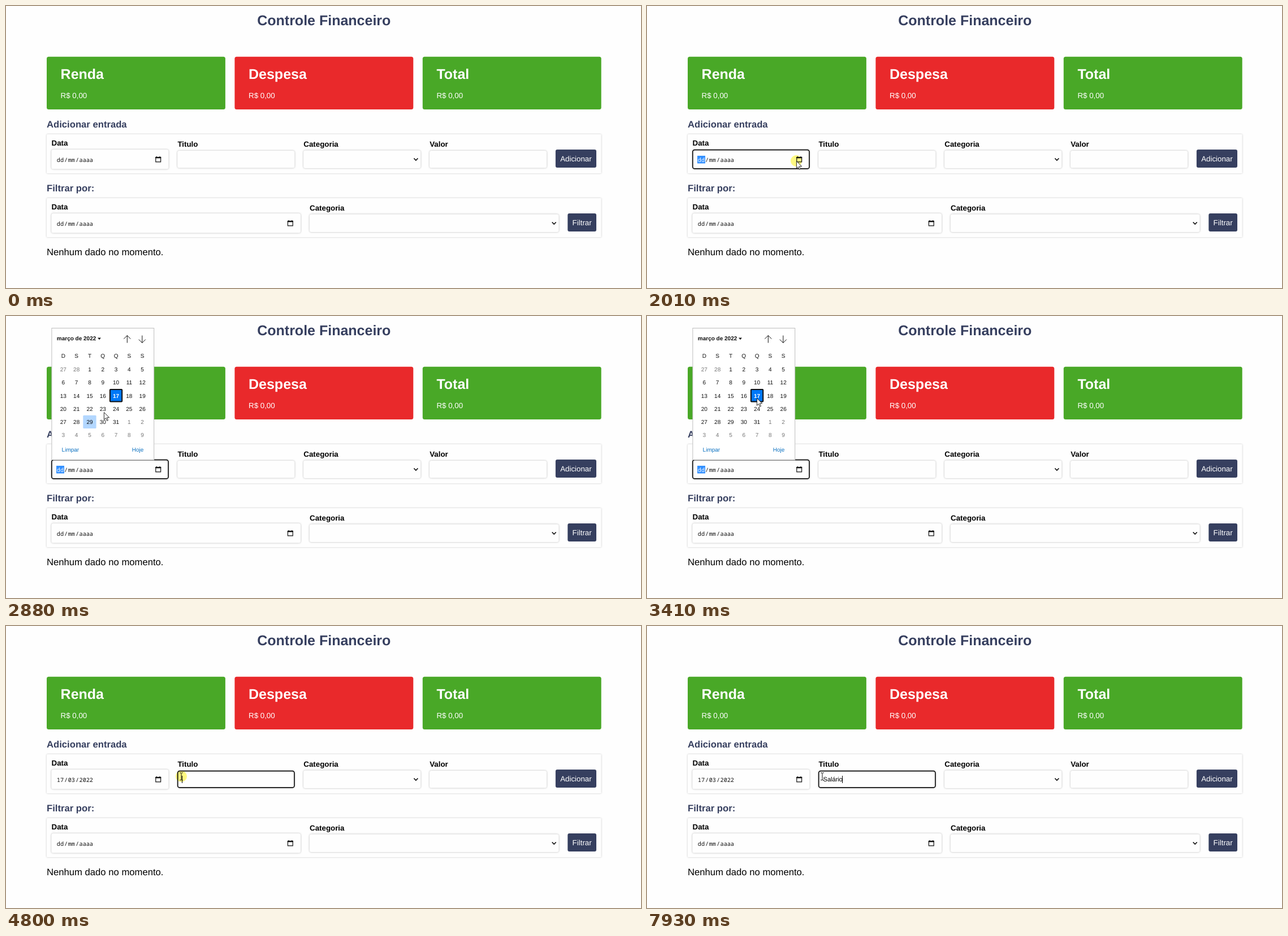
These frames come from a looping animation (1123x499 px, 8 s). An HTML page:

```html
<!DOCTYPE html>
<html lang="pt-BR">
<head>
<meta charset="utf-8">
<title>Controle Financeiro</title>
<style>
  html, body { margin: 0; width: 100%; height: 100%; overflow: hidden; background: #fefefe; }
  svg { display: block; width: 100%; height: 100%; }
  text { font-family: "Liberation Sans", Arial, sans-serif; text-rendering: geometricPrecision; white-space: pre; }
  .mono { font-family: "Noto Sans Mono", monospace; }
  .b { font-weight: bold; }
  .mid { text-anchor: middle; }
  .panel { filter: drop-shadow(0 0 1.6px rgba(0, 0, 0, .24)); }
  .field { filter: drop-shadow(0 0 1.4px rgba(0, 0, 0, .3)); }
</style>
</head>
<body>
<svg id="stage" viewBox="0 0 1123 499" xmlns="http://www.w3.org/2000/svg"></svg>
<script>
const LOOP = 8000;
const NAVY = '#363f5f', GREEN = '#49a827', RED = '#e9292b', PAPER = '#fefefe', INK = '#101010';
const LEFT = 72, GAP = 15.7;

const rect = (x, y, w, h, fill, r = 0, more = '') =>
  `<rect x="${x}" y="${y}" width="${w}" height="${h}" rx="${r}" fill="${fill}" ${more}/>`;
const text = (x, y, size, str, fill = '#000', cls = '', more = '') =>
  `<text x="${x}" y="${y}" font-size="${size}" fill="${fill}" class="${cls}" ${more}>${str}</text>`;
const line = (d, width = 1, more = '') =>
  `<path d="${d}" fill="none" stroke="${INK}" stroke-width="${width}" ${more}/>`;
const group = (id, body) => `<g id="${id}">${body}</g>`;

const card = ([name, color], i) => {
  const x = LEFT + 332.4 * i;
  return rect(x, 89.8, 315.9, 93.2, color, 3.5) +
    text(x + 24.6, 129, 25, name, '#fff', 'b') +
    text(x + 24.6, 163, 13.33, 'R$ 0,00', '#fff');
};

// A date in segments, so that its first one can be selected.
function dateText(id, x, y) {
  let count = 0, out = '';
  ['dd', '/', 'mm', '/', 'aaaa'].forEach((part, i) => {
    out += text(x + 9.5 + count * 6.62, y, 10.2, part, INK, 'mono', `id="${id}-${i}"`);
    count += part.length;
  });
  return out;
}

const dateIcon = (x, y) => line(`M${x + .6} ${y + 1.6}h8.8v8.3h-8.8z`, 1.2) +
  line(`M${x} ${y + 2.2}h10`, 2.4) + line(`M${x + 2.2} ${y}v2m5.6 0v-2`, 1.2);
const chevron = (x, y) => line(`M${x - 3.5} ${y - 1.8}l3.5 3.5 3.5-3.5`, 1.7);

const LIFT = { date: 0, select: 1.5, text: 2 };

function form(id, top, width, fields, action) {
  let x = 80.3;
  let out = rect(LEFT, top, 980.6, 69, PAPER, 1.5, 'class="panel"');
  for (const [name, kind] of fields) {
    const lift = LIFT[kind], y = top + 27 + lift, h = 34.5 - 2 * lift, key = `${id}-${name}`;
    out += text(x + .2, top + 20 + lift, 13.33, name, '#000', 'b') +
      rect(x, y, width, h, PAPER, 3.5, 'class="field"') +
      rect(x + .5, y + .6, width - 1, h - 1.2, 'none', 3.5, `id="${key}-focus" stroke="${INK}" stroke-width="1.7" display="none"`);
    if (kind === 'date') {
      out += rect(x + 8.7, top + 38, 14, 13.5, '#3390ff', 0, `id="${key}-selection" display="none"`) +
        dateText(key, x, top + 48.5) + dateIcon(x + width - 23.3, top + 39);
    }
    if (kind === 'select') out += chevron(x + width - 8.4, top + 44.3);
    x += width + GAP;
  }
  const w = 1044 - x;
  return out + rect(x, top + 27, w, 32, NAVY, 3) +
    text(x + w / 2, top + 47.6, 13.33, action, '#fff', 'mid');
}

// Calendar grid
const CELL = 23.3, GRID_X = 89.7, GRID_Y = 82.5;
const cellX = i => GRID_X + (i % 7) * CELL;
const cellY = i => GRID_Y + Math.floor(i / 7) * CELL;
const cellMid = i => cellX(i) + CELL / 2;

function calendar() {
  let out = rect(80.9, 21.5, 180.8, 233, '#fff', 0, 'stroke="#bdbdbd"') +
    text(89.8, 43.4, 10, 'março de 2022', INK, 'b') +
    `<path d="M162 38.5h6l-3 3.4z" fill="${INK}"/>` +
    line('M214.3 47.5v-13m-6 6l6-6 6 6M240.8 34.5v13m-6-6l6 6 6-6') +
    rect(0, 0, CELL, CELL, '#b3d7ff', 1.5, 'id="hover"');
  [...'DSTQQSS'].forEach((d, i) => out += text(cellMid(i), 74, 10, d, INK, 'mid'));
  for (let i = 0; i < 42; i++) {
    const day = new Date(2022, 1, 27 + i), inMonth = day.getMonth() === 2;
    const today = inMonth && day.getDate() === 17;
    if (today) out += rect(cellX(i) + 1, cellY(i) + 1, CELL - 2, CELL - 2, '#0078f8', 1, `stroke="${INK}" stroke-width="2"`);
    out += text(cellMid(i), cellY(i) + 15.4, 10, day.getDate(),
      today ? '#fff' : inMonth ? INK : '#767676', today ? 'mid b' : 'mid');
  }
  return out + text(98.6, 240.4, 10, 'Limpar', '#0a70c0') + text(222.8, 240.4, 10, 'Hoje', '#0a70c0');
}

const $ = id => document.getElementById(id);

$('stage').innerHTML =
  rect(0, 0, 1123, 499, PAPER) +
  text(562.3, 34, 25, 'Controle Financeiro', NAVY, 'b mid') +
  [['Renda', GREEN], ['Despesa', RED], ['Total', GREEN]].map(card).join('') +
  text(LEFT, 214.5, 16.67, 'Adicionar entrada', NAVY, 'b') +
  form('add', 227, 207.2, [['Data', 'date'], ['Titulo', 'text'], ['Categoria', 'select'], ['Valor', 'text']], 'Adicionar') +
  text(LEFT, 328, 16.67, 'Filtrar por:', NAVY, 'b') +
  form('filter', 340, 440.8, [['Data', 'date'], ['Categoria', 'select']], 'Filtrar') +
  text(LEFT, 441, 16.67, 'Nenhum dado no momento.') +
  text(311.5, 275, 11.1, '', '#000', '', 'id="entry"') +
  rect(0, 265, 1, 13, '#000', 0, 'id="caret"') +
  group('calendar', calendar()) +
  '<circle id="click" r="10" fill="#fffa82" style="mix-blend-mode:multiply"/>' +
  group('arrow', `<path d="M.4 .5v12.9l3-2.8 2.1 4.8 2-.9-2.1-4.7h4.2z" fill="#fff" stroke="${INK}" stroke-width=".9"/>`) +
  group('beam', line('M-2.8-6.2h2l.8.8.8-.8h2M0-5.4V5.9M-2.8 6.7h2l.8-.8.8.8h2'));

const ENTRANCE = { x: 1250, y: 515 };
const moves = [
  { start: 530, end: 780, steps: 5, x: 535, y: 357 },
  { start: 920, end: 1060, steps: 3, x: 203, y: 286 },
  { start: 1380, end: 1680, steps: 5, x: 264, y: 274 },
  { start: 2410, end: 2600, steps: 4, x: 127, y: 185 },
  { start: 2810, end: 2880, steps: 2, x: 173, y: 170 },
  { start: 2945, end: 3410, steps: 8, x: 194, y: 145 },
  { start: 4350, end: 4470, steps: 3, x: 310, y: 266 }
];
const OPEN = 2190, PICKED = 4020, BEAM = 4470;
const [FOCUS_DATE, PICK, FOCUS_TITLE] = [2010, 3700, 4800];
const CLICK_TIME = 180, HOVER_LAG = 70, BLINK = 540;
const bursts = [
  { start: 5340, gap: 320, letters: 'Sa' },
  { start: 6470, gap: 250, letters: 'lá' },
  { start: 7710, gap: 75, letters: 'rio' }
];
const keys = bursts.flatMap(({ start, gap, letters }) =>
  [...letters].map((letter, i) => ({ letter, time: start + i * gap })));

const within = (t, from, to) => t >= from && t < to;
const show = (id, on) => $(id).setAttribute('display', on ? 'inline' : 'none');
const place = (id, { x, y }) => $(id).setAttribute('transform', `translate(${x} ${y})`);

// Each move runs from the last resting place in equal, discrete steps.
function pointerAt(t) {
  let pos = ENTRANCE;
  for (const { start, end, steps, x, y } of moves) {
    if (t < start) break;
    const done = Math.floor((t - start) / (end - start) * (steps - 1) + 1e-6) + 1;
    const p = Math.min(1, done / steps);
    pos = { x: pos.x + (x - pos.x) * p, y: pos.y + (y - pos.y) * p };
  }
  return pos;
}

function renderPointer(t) {
  const pos = pointerAt(t);
  for (const id of ['arrow', 'beam', 'click']) place(id, pos);
  show('arrow', t < BEAM);
  show('beam', t >= BEAM);
  show('click', [FOCUS_DATE, PICK, FOCUS_TITLE].some(c => within(t, c, c + CLICK_TIME)));
}

function renderCalendar(t) {
  show('calendar', within(t, OPEN, PICKED));
  const { x, y } = pointerAt(t - HOVER_LAG);
  const col = Math.floor((x - GRID_X) / CELL), row = Math.floor((y - GRID_Y) / CELL);
  show('hover', within(col, 0, 7) && within(row, 0, 6));
  place('hover', { x: GRID_X + col * CELL, y: GRID_Y + row * CELL });
}

function renderFields(t) {
  const dateActive = within(t, FOCUS_DATE, FOCUS_TITLE);
  show('add-Data-focus', dateActive);
  show('add-Data-selection', dateActive);
  $('add-Data-0').setAttribute('fill', dateActive ? '#fff' : INK);
  const parts = (t < PICKED ? 'dd/mm/aaaa' : '17/03/2022').split('/');
  parts.forEach((part, i) => $(`add-Data-${2 * i}`).textContent = part);

  show('add-Titulo-focus', t >= FOCUS_TITLE);
  const pressed = keys.filter(key => key.time <= t);
  const entry = $('entry');
  entry.textContent = pressed.map(key => key.letter).join('');
  const lastInput = pressed.at(-1)?.time ?? FOCUS_TITLE;
  show('caret', t >= FOCUS_TITLE && (t - lastInput) % (2 * BLINK) < BLINK);
  $('caret').setAttribute('x', Math.floor(311.3 + entry.getComputedTextLength()));
}

const start = performance.now();
function tick() {
  const t = (performance.now() - start) % LOOP;
  renderPointer(t);
  renderCalendar(t);
  renderFields(t);
  requestAnimationFrame(tick);
}
tick();
</script>
</body>
</html>
```
